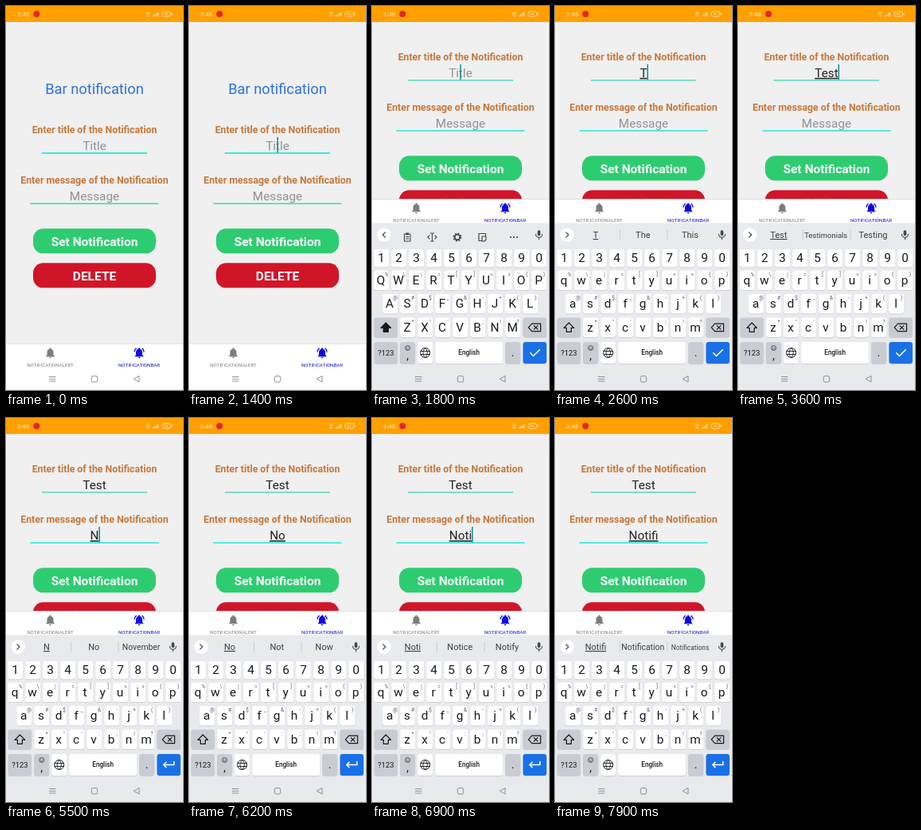
Write an HTML page that moves like this. It is 222 px wide and 480 px high and loops after 8 s.

```html
<!DOCTYPE html>
<html lang="en">
<head>
<meta charset="utf-8">
<title>Bar notification</title>
<style>
  html, body { margin: 0; width: 100%; height: 100%; overflow: hidden; background: #fff; }
  svg { display: block; width: 100vw; height: 100vh; }
  text { font-family: Roboto, sans-serif; text-anchor: middle; }
  .line { fill: none; stroke-linecap: round; stroke-linejoin: round; }
</style>
</head>
<body>
<svg id="stage" viewBox="0 0 222 480"></svg>
<script>
const LOOP = 8000;
const SCROLL = -91, TAB_LIFT = -180.8;
const KEY_FILL = '#fff', KEY_DOWN = '#d3d6db', SIDE_FILL = '#c9cdd3', INK = '#18191b', ICON = '#44474b';
const STATUS_INK = '#ffe6b8';
const WORD_SIZE = 11, WORD_ROOM = [50, 54, 47.5];
const BELL = 'M12 22c1.1 0 2-.9 2-2h-4c0 1.1.9 2 2 2zm6-6v-5c0-3.1-1.6-5.6-4.5-6.3V4a1.5 1.5 0 0 0-3 0v.7C7.6 5.4 6 7.9 6 11v5l-2 2v1h16v-1z';
const WAVES = 'M7.6 4.1 6.2 2.7C3.8 4.5 2.2 7.3 2 10.5h2c.2-2.6 1.5-5 3.6-6.4zM20 10.5h2c-.2-3.2-1.7-6-4.1-7.8l-1.4 1.4c2 1.4 3.3 3.7 3.5 6.4z';

// What is on screen from each moment on.
const steps = [
  { at: 0 },
  { at: 1400, field: 'title' },
  { at: 2400, field: 'title', title: 'T', key: 't', words: ['T', 'The', 'This'] },
  { at: 2700, field: 'title', title: 'Te', key: 'e', words: ['Te', 'Text', 'Test'] },
  { at: 3000, field: 'title', title: 'Tes', key: 's', words: ['Tes', 'Test', 'Testing'] },
  { at: 3300, field: 'title', title: 'Test', key: 't', words: ['Test', 'Testimonials', 'Testing'] },
  { at: 4800, field: 'message', title: 'Test' },
  { at: 5100, field: 'message', title: 'Test', message: 'N', key: 'n', words: ['N', 'No', 'November'] },
  { at: 5700, field: 'message', title: 'Test', message: 'No', key: 'o', words: ['No', 'Not', 'Now'] },
  { at: 6500, field: 'message', title: 'Test', message: 'Not', key: 't', words: ['Not', 'Note', 'Nothing'] },
  { at: 6700, field: 'message', title: 'Test', message: 'Noti', key: 'i', words: ['Noti', 'Notice', 'Notify'] },
  { at: 7000, field: 'message', title: 'Test', message: 'Notif', key: 'f', words: ['Notif', 'Notify', 'Notification'] },
  { at: 7200, field: 'message', title: 'Test', message: 'Notifi', key: 'i', words: ['Notifi', 'Notification', 'Notifications'] }
];

const escape = s => s.replace(/&/g, '&amp;').replace(/</g, '&lt;');
const text = (x, y, size, fill, content, extra = '') =>
  `<text x="${x}" y="${y}" font-size="${size}" fill="${fill}" ${extra}>${escape(content)}</text>`;
const rect = (x, y, w, h, r, fill, extra = '') =>
  `<rect x="${x}" y="${y}" width="${w}" height="${h}" rx="${r}" fill="${fill}" ${extra}/>`;
const path = (d, color, width = 1, extra = '') =>
  `<path class="line" d="${d}" stroke="${color}" stroke-width="${width}" ${extra}/>`;
const circle = (x, y, r, fill, extra = '') => `<circle cx="${x}" cy="${y}" r="${r}" fill="${fill}" ${extra}/>`;
const group = (id, content) => `<g id="${id}">${content}</g>`;

function key(cx, y, w, h, label = '', hint = '', fill = KEY_FILL) {
  const x = cx - w / 2;
  const letter = /[a-z]/.test(label);
  return rect(x, y + .8, w, h, 3.2, '#c3c6cb') +
    rect(x, y, w, h, 3.2, fill, letter ? `data-key="${label}"` : '') +
    (label && text(cx - (hint ? .6 : 0), y + h / 2 + 5.2, 15.4, INK, label, letter ? 'class="letter"' : '')) +
    (hint && text(cx + 6.4, y + 7.4, 6.4, '#55585c', hint));
}

function keyRow(letters, hints, left, y, h) {
  return [...letters].map((c, i) => key(left + 22 * i, y, 19, h, c, hints[i] || '')).join('');
}

function field(id, hint, y, half) {
  return text(111, y, 15.3, '#929292', hint, `id="${id}Text"`) +
    path(`M${111 - half} ${y + 4}H${111 + half}`, '#20e6d4', 1.6, `id="${id}Line" style="stroke-linecap:butt"`) +
    rect(110.3, y - 16, 1.5, 19.5, 0, '#128a8e', `id="${id}Caret"`);
}

function content() {
  const label = (y, s) => text(111, y, 12.3, '#c8773a', s, 'font-weight="700"');
  const button = (y, fill, s) => rect(34, y, 154, 31, 12.5, fill) +
    text(111, y + 21.8, 15.5, '#fff', s, 'font-weight="700"');
  return text(111, 109.6, 18.3, '#2d72e0', 'Bar notification') +
    label(159, 'Enter title of the Notification') + field('title', 'Title', 179.8, 66) +
    label(222, 'Enter message of the Notification') + field('message', 'Message', 243, 80.5) +
    button(278.3, '#2ecc71', 'Set Notification') + button(321.3, '#d11529', 'DELETE');
}

function statusBar() {
  const bars = [0, 1, 2, 3].map(i => rect(184 + i * 2, 11.5 - i * 1.3, 1.2, 1.5 + i * 1.3, 0, STATUS_INK)).join('');
  return rect(0, 0, 222, 20, 0, '#ffa000') +
    text(21.5, 13, 8, STATUS_INK, '3:48') + circle(38.3, 10, 4, '#e3262e') +
    path('M176.5 8h3.5M176.5 10h3.5M176.5 12.5h3.5', STATUS_INK, .9) + bars +
    rect(196, 7, 10.5, 6, 2, 'none', `stroke="${STATUS_INK}" stroke-width=".9"`) +
    path('M199 10h4M208 9v2', STATUS_INK, 1);
}

function tabBar() {
  const tab = (x, fill, icon, s) =>
    `<path transform="translate(${x - 8},425.5) scale(.667)" d="${icon}" fill="${fill}"/>` +
    text(x, 450.8, 6.15, fill, s);
  return rect(0, 422, 222, 30.5, 0, '#fff') + rect(0, 421.8, 222, .7, 0, '#d4d4d4') +
    tab(55.5, '#7c7c7c', BELL, 'NOTIFICATIONALERT') + tab(167, '#0a0ae0', BELL + WAVES, 'NOTIFICATIONBAR');
}

function navBar() {
  return path('M54.5 463.5h7.5M54.5 466.3h7.5M54.5 469h7.5M167 462.8v7.2l-6.5-3.6z', '#858585', .9) +
    rect(107.3, 462.6, 7.4, 7.4, 1.8, 'none', 'stroke="#858585" stroke-width=".9"');
}

function toolbar() {
  const gear = circle(107, 289, 3.3, 'none', `stroke="${ICON}" stroke-width="1.8"`) +
    circle(107, 289, 4.8, 'none', `stroke="${ICON}" stroke-width="1.5" stroke-dasharray="1.9 1.87"`);
  return path('M40.5 285h7.5v9h-7.5zM42.7 284h3v1.8h-3zM42.5 288.5h3.5M42.5 291h3.5', ICON, 1.1) +
    path('M73.5 284h4M75.5 284v10M73.5 294h4M72 287l-2 2 2 2M79 287l2 2-2 2', ICON, 1.1) + gear +
    path('M142.5 288v-3.5h-8.5v9h4M138 288h5v4l-2 2h-3z', ICON, 1.2) +
    [174, 178, 182].map(x => circle(x, 289, 1.1, ICON)).join('');
}

function bottomRow(y, h) {
  const mid = y + h / 2;
  return key(17.4, y, 29.5, h, '', '', SIDE_FILL) + text(17.4, mid + 3.6, 9.4, INK, '?123') +
    key(44.7, y, 19, h, '', '', SIDE_FILL) + text(44.7, mid + 8, 14, INK, ',') +
    circle(44.7, mid - 6, 3, 'none', `stroke="${ICON}" stroke-width=".9"`) +
    path(`M43.2 ${mid - 5.3}a1.7 1.7 0 0 0 3 0M43.6 ${mid - 6.9}h.1M45.8 ${mid - 6.9}h.1`, ICON, .8) +
    key(66.7, y, 19, h) + circle(66.7, mid, 6, 'none', `stroke="${INK}" stroke-width="1"`) +
    path(`M61.1 ${mid - 2}h11.2M61.1 ${mid + 2}h11.2M66.7 ${mid - 6}c-3.6 3.5-3.6 8.5 0 12c3.6-3.5 3.6-8.5 0-12`, INK, .9) +
    key(121.7, y, 85, h) + text(121.7, mid + 2.9, 8.2, INK, 'English', 'font-weight="500"') +
    key(176.7, y, 19, h, '', '', SIDE_FILL) + text(176.7, mid + 4.6, 14, INK, '.') +
    key(204.2, y, 29.5, h, '', '', '#1a70e6') +
    path('', '#fff', 1.6, `id="action" transform="translate(204.2 ${mid})"`);
}

function keyboard() {
  const mic = rect(207.6, 280.3, 3.6, 7, 1.8, ICON) + path('M205.4 285.3a4 4 0 0 0 8 0M209.4 289.3v2.5', ICON, 1.1);
  const words = [51, 110.3, 169.5].map((x, i) =>
    text(x, 290, WORD_SIZE, '#3c4043', '', 'class="word"' + (i ? '' : ' text-decoration="underline"'))).join('');
  return rect(0, 271.5, 222, 209, 0, '#e8eaed') +
    circle(15.2, 286, 8.7, '#fff') + path('', ICON, 1.2, 'id="chevron"') + mic +
    group('toolbar', toolbar()) +
    group('words', words + path('M81.5 280v12M141 280v12', '#c4c7cb', .8)) +
    keyRow('1234567890', '', 11.7, 304, 22.5) +
    keyRow('qwertyuiop', '%\\|=[]<>{}', 11.7, 330.7, 24.5) +
    keyRow('asdfghjkl', '@#$_&-+()', 22.7, 360, 24.5) +
    keyRow('zxcvbnm', '*"\':;!?', 44.7, 389.5, 24.5) +
    key(17.4, 389.5, 29.5, 24.5, '', '', SIDE_FILL) +
    path('M17.4 396l-6.3 6.3h3.3v5h6v-5h3.3z', INK, 1.2, 'id="shift"') +
    key(204.2, 389.5, 29.5, 24.5, '', '', SIDE_FILL) +
    path('M200.5 397.2h11v9.4h-11l-4.3-4.7zM203.2 399.6l4.6 4.6M207.8 399.6l-4.6 4.6', INK, 1.2) +
    bottomRow(420, 27);
}

const stage = document.getElementById('stage');
stage.innerHTML = rect(0, 0, 222, 480, 0, '#f0f0f0') + group('content', content()) + statusBar() +
  group('tabs', tabBar()) + rect(0, 452.3, 222, 28, 0, '#fff') + group('keyboard', keyboard()) + navBar();

const $ = id => document.getElementById(id);
const keys = [...stage.querySelectorAll('[data-key]')];
const letters = [...stage.querySelectorAll('.letter')];
const words = [...stage.querySelectorAll('.word')];
const show = (el, on) => el.setAttribute('visibility', on ? 'inherit' : 'hidden');

function drawField(id, hint, step, caretOn) {
  const value = step[id] || '', active = step.field === id, node = $(id + 'Text');
  node.textContent = value || hint;
  node.setAttribute('fill', value ? '#222' : '#929292');
  node.setAttribute('text-decoration', active && value ? 'underline' : 'none');
  $(id + 'Caret').setAttribute('x', 110.3 + (value ? node.getComputedTextLength() / 2 + .6 : 0));
  show($(id + 'Caret'), active && caretOn);
}

// Long suggestions get a smaller size so that they stay inside their cell.
function drawWord(node, word, room) {
  node.textContent = word;
  node.setAttribute('font-size', WORD_SIZE);
  const width = node.getComputedTextLength();
  if (width > room) node.setAttribute('font-size', WORD_SIZE * room / width);
}

function drawStep(step, caretOn, pressed) {
  drawField('title', 'Title', step, caretOn);
  drawField('message', 'Message', step, caretOn);
  const typing = !!step.words;
  show($('toolbar'), !typing);
  show($('words'), typing);
  $('chevron').setAttribute('d', typing ? 'M13.8 282.8l3.2 3.2-3.2 3.2' : 'M16.6 282.8l-3.2 3.2 3.2 3.2');
  words.forEach((node, i) => drawWord(node, typing ? step.words[i] : '', WORD_ROOM[i]));
  letters.forEach(node => {
    node.textContent = typing ? node.textContent.toLowerCase() : node.textContent.toUpperCase();
  });
  $('shift').style.fill = typing ? 'none' : INK;
  $('action').setAttribute('d', step.field === 'message'
    ? 'M6.5-4v4h-13M-3.3-3.2l-3.2 3.2 3.2 3.2' : 'M-5.5.3l3.7 3.7 7.8-7.8');
  keys.forEach(node => node.setAttribute('fill', pressed && node.dataset.key === step.key ? KEY_DOWN : KEY_FILL));
}

function drawLayout(t) {
  const rise = Math.min(1, Math.max(0, (t - 1480) / 220));
  const raised = t >= 1620;
  $('keyboard').setAttribute('transform', `translate(0 ${208 * (1 - rise) ** 2})`);
  $('content').setAttribute('transform', `translate(0 ${raised ? SCROLL : 0})`);
  $('tabs').setAttribute('transform', `translate(0 ${raised ? TAB_LIFT : 0})`);
  for (const [id, bold] of [['title', !raised], ['message', raised]]) {
    $(id + 'Line').setAttribute('stroke-width', bold ? 1.7 : 1.3);
    $(id + 'Line').setAttribute('stroke', bold ? '#1cebd8' : '#3fd4b6');
  }
}

let drawn = '';
function frame() {
  const t = performance.now() % LOOP;
  const index = steps.findLastIndex(s => s.at <= t);
  const step = steps[index], age = t - step.at;
  const caretOn = age % 1000 < 500, pressed = age < 100;
  const state = [index, caretOn, pressed].join();
  drawLayout(t);
  if (state !== drawn) drawStep(step, caretOn, pressed);
  drawn = state;
  requestAnimationFrame(frame);
}
frame();
</script>
</body>
</html>
```
